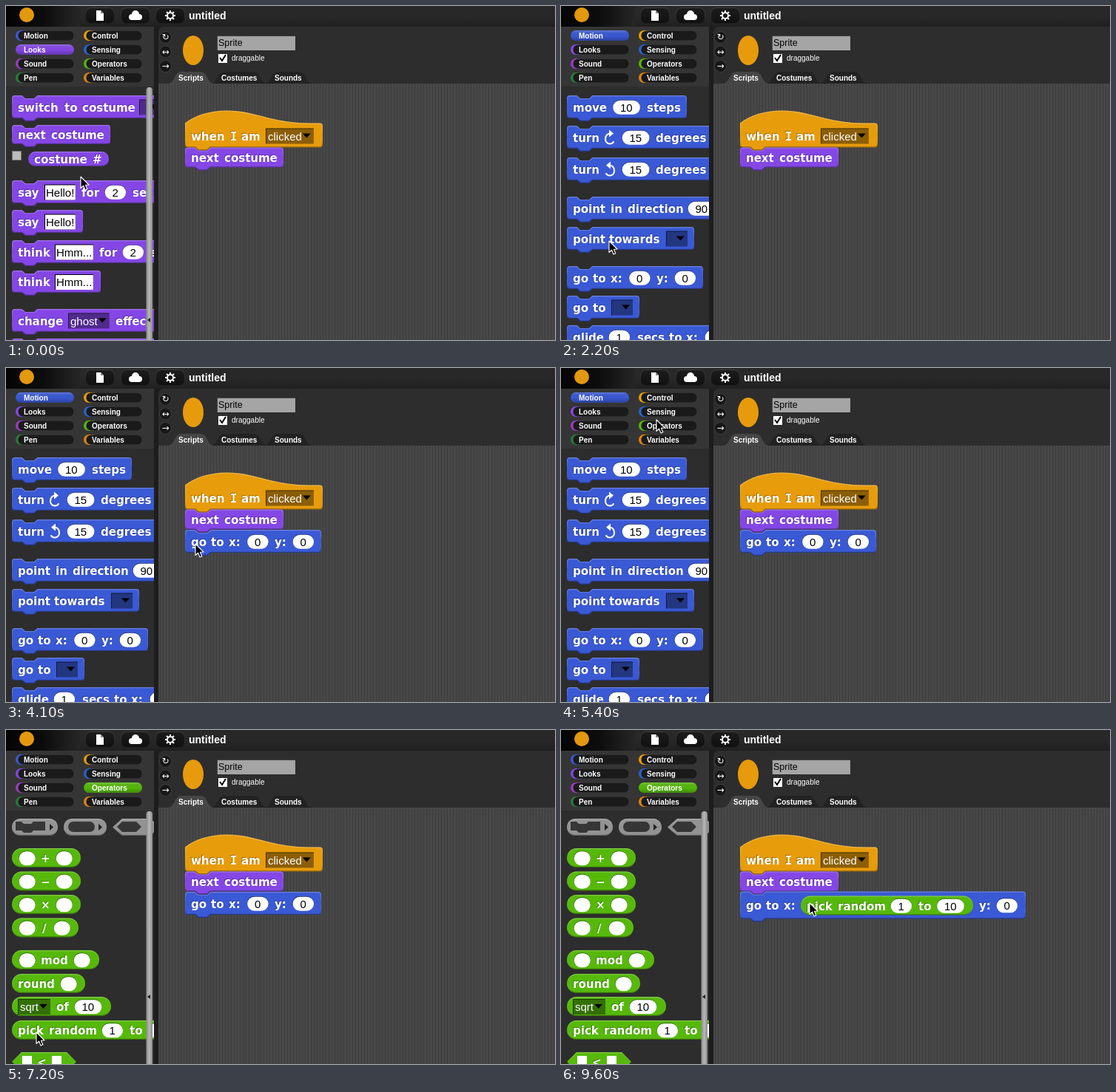
An HTML page with a canvas for the animation above (9700 ms loop, 742x452 px).

```html
<!DOCTYPE html>
<html lang="en">
<head>
<meta charset="utf-8">
<title>Block editor</title>
<style>
html, body { margin: 0; width: 100%; height: 100%; overflow: hidden; background: #1c1c1c; }
canvas { display: block; }
</style>
</head>
<body>
<canvas id="stage" width="742" height="452"></canvas>
<script>
const ctx = document.getElementById('stage').getContext('2d');
const LOOP = 9700, STEP = 100;
const BLOCK_FONT = 'bold 15px "DejaVu Sans", sans-serif';
const sans = (size, bold) => `${bold ? 'bold ' : ''}${size}px "Liberation Sans", Arial, sans-serif`;
const BLUE = '#3a59d4', PURPLE = '#8447e5', GREEN = '#56b90a', ORANGE = '#e79c0b';

// Block rows: x, y, width, height, labels. Labels are "offset:text", where
// (n) is a rounded slot, [s] a text slot and {s} a drop-down.
const GOTO = '8:go 35:to 59:x: 83.5:(0) 121:y: 145:(0)';
const GOTO_RANDOM = '8:go 35:to 59:x: 323:y: 346:(0)';
const RANDOM = '8:pick 50:random 121:(1) 159:to 183.5:(10)';
const PALETTES = {
  Looks: { color: PURPLE, grip: 425, rows: [
    [8, 121, 240, 31, '8:switch 71:to 95:costume 172:{}'],
    [8, 161, 133, 26, '8:next 53:costume'],
    [30, 197, 109, 20, '8:costume 87:#', 'pill'],
    [8, 236, 220, 31, '8:say 44:[Hello!] 94:for 125:(2) 163:secs'],
    [8, 276, 96, 31, '8:say 44:[Hello!]'],
    [8, 317, 240, 31, '8:think 58:[Hmm...] 118:for 149:(2) 187:secs'],
    [8, 358, 120, 30, '8:think 58:[Hmm...]'],
    [8, 410, 240, 31, '8:change 76:{ghost} 140:effect'],
    [8, 450, 240, 31, '']
  ] },
  Motion: { color: BLUE, rows: [
    [8, 121, 162, 31, '8:move 61.5:(10) 108:steps'],
    [8, 162, 196, 31, '8:turn 51:cw 74:(15) 120:degrees'],
    [8, 205, 196, 31, '8:turn 51:ccw 74:(15) 120:degrees'],
    [8, 258, 202, 31, '8:point 59:in 82:direction 163:(90)'],
    [8, 299, 172, 31, '8:point 57:towards 134:{}'],
    [8, 352, 184, 31, GOTO],
    [8, 392, 98, 31, '8:go 35:to 60:{}'],
    [8, 432, 300, 31, '8:glide 56:(1) 95:secs 138:to 161:x: 186:(0)']
  ] },
  Operators: { color: GREEN, grip: 361, rows: [
    [8, 160, 93, 26, '9:() 39:+ 59:()', 'pill'],
    [8, 191.5, 93, 26, '9:() 39:− 59:()', 'pill'],
    [8, 223, 93, 26, '9:() 39:× 59:()', 'pill'],
    [8, 254.5, 90, 26, '9:() 41:/ 56:()', 'pill'],
    [8, 298, 118, 26, '9:() 39:mod 83:()', 'pill'],
    [8, 330, 99, 26, '8:round 65:()', 'pill'],
    [8, 361, 134, 26, '8:{sqrt} 60:of 84:(10)', 'pill'],
    [8, 393, 232, 26, RANDOM, 'pill'],
    [8, 436, 87, 26, '34:<', 'hex']
  ] }
};
const CATEGORIES = [
  ['Motion', 13, 40, BLUE], ['Looks', 13, 59, PURPLE],
  ['Sound', 13, 78, '#9a3cc0'], ['Pen', 13, 97, '#2a7a3a'],
  ['Control', 105, 40, ORANGE], ['Sensing', 105, 59, '#2a62cc'],
  ['Operators', 105, 78, GREEN], ['Variables', 105, 97, '#dc8412']
];

// Pointer path: time, x, y
const POINTER = [
  [0, 101, 231], [300, 95, 215], [900, 46, 41], [1600, 46, 41],
  [2200, 65, 318], [2500, 19, 369], [2700, 19, 369], [3000, 225, 295],
  [3400, 370, 238], [3500, 384, 233], [3900, 256, 238], [4300, 256, 238],
  [5100, 138, 92], [5400, 129, 70], [6000, 129, 76], [6600, 129, 76],
  [7200, 41, 409], [7300, 43, 409], [8000, 345, 263], [8500, 336, 234],
  [9700, 336, 234]
];
const PICK_MOTION = 1300, GRAB_GOTO = 2700, DROP_GOTO = 4000;
const PICK_OPS = 6300, GRAB_RANDOM = 7300, DROP_RANDOM = 8700;

function pointerAt(t) {
  const i = Math.max(1, POINTER.findIndex(k => k[0] > t));
  const [t0, x0, y0] = POINTER[i - 1], [t1, x1, y1] = POINTER[i];
  const p = (t - t0) / (t1 - t0);
  return [x0 + (x1 - x0) * p, y0 + (y1 - y0) * p];
}

function text(s, x, y, font, color = '#fff') {
  ctx.font = font;
  ctx.fillStyle = color;
  ctx.fillText(s, x, y);
}

function rect(x, y, w, h, color) {
  ctx.fillStyle = color;
  ctx.fillRect(x, y, w, h);
}

function round(x, y, w, h, r, color) {
  ctx.beginPath();
  ctx.roundRect(x, y, w, h, r);
  ctx.fillStyle = color;
  ctx.fill();
}

function poly(points, color) {
  ctx.beginPath();
  points.forEach(([x, y]) => ctx.lineTo(x, y));
  ctx.closePath();
  ctx.fillStyle = color;
  ctx.fill();
}

function gradient(x0, y0, x1, y1, ...colors) {
  const g = ctx.createLinearGradient(x0, y0, x1, y1);
  colors.forEach((c, i) => g.addColorStop(i / (colors.length - 1), c));
  return g;
}
const vertical = (y0, y1, ...colors) => gradient(0, y0, 0, y1, ...colors);
const horizontal = (x0, x1, ...colors) => gradient(x0, 0, x1, 0, ...colors);

function blockPath(w, h, kind) {
  if (kind === 'pill') {
    const p = new Path2D();
    p.roundRect(0, 0, w, h, Math.min(h / 2, 13));
    return p;
  }
  if (kind === 'hex') {
    return new Path2D(`M0 ${h / 2}L13 0H${w - 13}L${w} ${h / 2}L${w - 13} ${h}H13Z`);
  }
  const top = kind === 'hat'
    ? 'M0 -1C16 -14 43 -21 73 -17C103 -13 125 -1 168 -1'
    : 'M0 4Q0 0 4 0H13.5L18 4H30L34.5 0';
  const y = kind === 'hat' ? -1 : 0;
  return new Path2D(`${top}H${w - 4}Q${w} ${y} ${w} ${y + 4}V${h - 4}Q${w} ${h} ${w - 4} ${h}` +
    `H34.5L30 ${h + 4}H18L13.5 ${h}H4Q0 ${h} 0 ${h - 4}Z`);
}

function turnIcon(x, mid, dir) {
  ctx.save();
  ctx.translate(x + 7, mid + 1);
  ctx.scale(dir, 1);
  ctx.strokeStyle = '#fff';
  ctx.lineWidth = 2;
  ctx.beginPath();
  ctx.arc(0, 2, 6, 0, Math.PI * 0.85);
  ctx.moveTo(6, 2);
  ctx.quadraticCurveTo(6, -5, 0, -6);
  ctx.stroke();
  poly([[1, -11], [1, -1], [-5, -6]], '#fff');
  ctx.restore();
}

function label(token, mid) {
  const cut = token.indexOf(':');
  const x = +token.slice(0, cut), s = token.slice(cut + 1);
  const inner = s.slice(1, -1);
  if (s === 'cw' || s === 'ccw') return turnIcon(x, mid, s === 'cw' ? -1 : 1);
  ctx.font = sans(15);
  const w = ctx.measureText(inner).width;
  if (s[0] === '(') {
    const full = inner ? w + 21 : 23;
    round(x, mid - 9.5, full, 20, 10, vertical(mid - 9.5, mid + 10.5, 'rgba(0,0,0,.5)', 'rgba(0,0,0,0)'));
    round(x + 0.7, mid - 8.8, full - 1, 19, 9.5, '#fff');
    text(inner, x + (full - w) / 2, mid + 6, sans(15), '#000');
  } else if (s[0] === '[') {
    rect(x, mid - 10, w + 3.5, 21, '#000');
    rect(x + 1, mid - 9, w + 2.5, 20, '#fff');
    text(inner, x + 2, mid + 6, sans(15), '#000');
  } else if (s[0] === '{') {
    const full = Math.max(w, 10) + 19;
    rect(x, mid - 10, full, 21, 'rgba(0,0,0,.4)');
    rect(x, mid - 10, full, 1, 'rgba(0,0,0,.5)');
    rect(x, mid - 9, 1, 20, 'rgba(0,0,0,.5)');
    text(inner, x + 3, mid + 6, sans(15));
    poly([[x + full - 15, mid - 3], [x + full - 4, mid - 3], [x + full - 9.5, mid + 3]], '#000');
  } else {
    const font = s === 'I' ? 'bold 15px "DejaVu Sans Mono", monospace' : BLOCK_FONT;
    text(s, x - 1, mid + 5, font, 'rgba(0,0,0,.3)');
    text(s, x, mid + 6, font);
  }
}

function block(color, x, y, w, h, labels, kind, lifted) {
  const path = blockPath(w, h, kind);
  ctx.save();
  ctx.translate(x, y);
  if (lifted) {
    ctx.save();
    ctx.translate(5, 5);
    ctx.fillStyle = 'rgba(0,0,0,.35)';
    ctx.fill(path);
    ctx.restore();
  }
  ctx.fillStyle = color;
  ctx.fill(path);
  ctx.save();
  ctx.clip(path);
  ctx.lineWidth = 2.4;
  ctx.strokeStyle = vertical(0, h, 'rgba(255,255,255,.25)', 'rgba(255,255,255,0)', 'rgba(0,0,0,.4)');
  ctx.stroke(path);
  ctx.restore();
  if (labels) labels.split(' ').forEach(s => label(s, h / 2));
  ctx.restore();
}

function ringShapes() {
  const grey = '#939393', dark = '#363636';
  block(grey, 8, 120, 62, 23, '', 'pill');
  poly([[13, 124], [21, 124], [24, 127], [34, 127], [37, 124], [53, 124], [53, 136],
    [37, 136], [34, 139], [24, 139], [21, 136], [13, 136]], dark);
  block(grey, 78, 120, 58, 23, '', 'pill');
  round(84, 124, 36, 14, 7, dark);
  block(grey, 144, 120, 64, 23, '', 'hex');
  poly([[150, 131], [157, 124], [176, 124], [183, 131], [176, 138], [157, 138]], dark);
  [59, 125].forEach(x => poly([[x, 127], [x + 5, 131.5], [x, 136]], '#222'));
}

function palette(name) {
  const { color, rows, grip } = PALETTES[name];
  ctx.save();
  ctx.beginPath();
  ctx.rect(0, 109, 200, 343);
  ctx.clip();
  if (name === 'Operators') ringShapes();
  rows.forEach(row => block(color, ...row));
  if (name === 'Looks') {
    rect(8, 196, 13, 13, '#777');
    rect(9, 197, 11, 11, '#bdbdbd');
  }
  if (name === 'Operators') {
    [22, 62].forEach(x => rect(x, 441, 13, 16, '#fff'));
  }
  if (grip) {
    round(189.5, 110, 8.5, 350, 4, horizontal(189.5, 198, '#8a8a8a', '#b8b8b8', '#8a8a8a'));
    poly([[195, grip - 3], [195, grip + 3], [191, grip]], '#222');
  }
  ctx.restore();
}

function category([name, x, mid, color], selected, hovered) {
  const y = mid - 7;
  if (selected) {
    round(x, y, 79, 14, 7, color);
    round(x, y, 79, 14, 7, vertical(y, y + 14, 'rgba(255,255,255,.2)', 'rgba(0,0,0,0)', 'rgba(0,0,0,.25)'));
  } else {
    round(x, y, 79, 14, 7, horizontal(x, x + 16, color, color, '#3a3a3a'));
    round(x + 3.5, y + 0.8, 75, 12.6, 6, hovered ? '#0c0c0c' : '#1a1a1a');
  }
  text(name, x + 11, mid + 4, sans(10, true));
}

function topBar() {
  rect(0, 0, 742, 28, vertical(0, 28, '#282828', '#282828', '#202020'));
  rect(0, 0, 100, 28, horizontal(0, 100, '#050505', '#0c0c0c', '#262626'));
  ctx.beginPath();
  ctx.arc(28, 12, 10, 0, 7);
  ctx.fillStyle = '#e2980f';
  ctx.fill();
  [107, 155, 202].forEach(x => {
    round(x, 2, 40, 22, 8, vertical(2, 24, '#3c3c3c', '#1c1c1c'));
    round(x + 1, 3, 38, 20, 7, vertical(3, 23, '#1c1c1c', '#101010'));
  });
  poly([[122, 6], [128, 6], [132, 10], [132, 20], [122, 20]], '#fff');
  poly([[128, 6], [128, 10], [132, 10]], '#888');
  ctx.fillStyle = '#fff';
  ctx.beginPath();
  [[170, 15, 4], [175, 11, 5], [180, 15, 4]].forEach(c => {
    ctx.moveTo(c[0], c[1]);
    ctx.arc(...c, 0, 7);
  });
  ctx.fill();
  rect(170, 14, 10, 5, '#fff');
  ctx.strokeStyle = '#fff';
  ctx.lineWidth = 2;
  ctx.beginPath();
  ctx.arc(222, 13, 4, 0, 7);
  for (let i = 0; i < 8; i++) {
    const a = i * Math.PI / 4;
    ctx.moveTo(222 + 4 * Math.cos(a), 13 + 4 * Math.sin(a));
    ctx.lineTo(222 + 7 * Math.cos(a), 13 + 7 * Math.sin(a));
  }
  ctx.stroke();
  text('untitled', 247, 18, sans(14, true));
}

function tab(x, w, name, color) {
  ctx.beginPath();
  ctx.moveTo(x - 14, 105);
  ctx.bezierCurveTo(x - 4, 104, x - 6, 89, x + 4, 89);
  ctx.lineTo(x + w - 4, 89);
  ctx.bezierCurveTo(x + w + 6, 89, x + w + 4, 104, x + w + 14, 105);
  ctx.fillStyle = color;
  ctx.fill();
  text(name, x, 101, sans(10, true));
}

function spriteBar() {
  round(206, 28, 540, 80, [7, 0, 0, 0], '#2d2d2d');
  ['↻', '↔', '→'].forEach((s, i) => {
    const y = 42 + i * 19.5;
    round(207, y - 8, 17, 17, 8.5, '#3c3c3c');
    round(208, y - 7, 15, 15, 7.5, '#171717');
    ctx.textAlign = 'center';
    text(s, 215.5, y + 4, '12px "DejaVu Sans", sans-serif');
    ctx.textAlign = 'left';
  });
  ctx.beginPath();
  ctx.ellipse(253, 60, 14, 20, 0, 0, 7);
  ctx.fillStyle = '#e79a0c';
  ctx.fill();
  rect(285, 40, 106, 20, '#444');
  rect(286, 41, 105, 19, '#a5a5a5');
  text('Sprite', 287, 54, sans(12.5), '#000');
  rect(287, 65, 12, 12, '#fff');
  ctx.strokeStyle = '#000';
  ctx.lineWidth = 2;
  ctx.beginPath();
  ctx.moveTo(289, 70);
  ctx.lineTo(292, 74);
  ctx.lineTo(297, 66);
  ctx.stroke();
  text('draggable', 305, 74, sans(10));
  tab(363, 37, 'Sounds', '#222');
  tab(291, 48, 'Costumes', '#222');
  tab(233, 34, 'Scripts', '#464646');
}

function scriptsPane() {
  rect(206, 105, 536, 347, '#484848');
  for (let x = 208; x < 742; x += 4) rect(x, 105, 1, 347, '#3c3c3c');
}

function pointer(x, y) {
  ctx.save();
  ctx.translate(x, y);
  ctx.lineJoin = 'round';
  poly([[0, 0], [0, 15.5], [3.6, 12.2], [6, 18], [8.8, 16.8], [6.4, 11.2], [11, 11]], '#000');
  ctx.strokeStyle = '#fff';
  ctx.lineWidth = 1.1;
  ctx.stroke();
  ctx.restore();
}

function draw(t) {
  const [px, py] = pointerAt(t);
  const current = t < PICK_MOTION ? 'Looks' : t < PICK_OPS ? 'Motion' : 'Operators';

  rect(0, 0, 742, 452, '#1d1d1d');
  topBar();
  rect(0, 28, 200, 82, '#353535');
  rect(0, 109, 200, 343, '#2d2d2d');
  CATEGORIES.forEach(c => {
    const hovered = px > c[1] && px < c[1] + 79 && Math.abs(py - c[2]) < 8;
    category(c, c[0] === current, hovered);
  });
  palette(current);
  spriteBar();
  scriptsPane();

  block(ORANGE, 242, 159.5, 186, 32, '8:when 61:I 76:am 109:{clicked}', 'hat');
  block(PURPLE, 242, 191.5, 133, 27, '8:next 53:costume');
  if (t >= DROP_RANDOM) {
    block(BLUE, 242, 218.5, 386, 37, GOTO_RANDOM);
    block(GREEN, 324, 224.5, 233, 26, RANDOM, 'pill');
  } else if (t >= DROP_GOTO) {
    block(BLUE, 242, 219, 184, 31, GOTO);
  }
  if (t >= GRAB_GOTO && t < DROP_GOTO) {
    block(BLUE, px - 11, py - 17.5, 184, 31, GOTO, '', true);
  }
  if (t >= GRAB_RANDOM && t < DROP_RANDOM) {
    block(GREEN, px - 35, py - 14, 232, 26, RANDOM, 'pill', true);
  }
  pointer(px, py);
}

const start = performance.now();
function tick() {
  const t = (performance.now() - start) % LOOP;
  draw(Math.floor(t / STEP) * STEP);
  requestAnimationFrame(tick);
}
tick();
</script>
</body>
</html>
```
